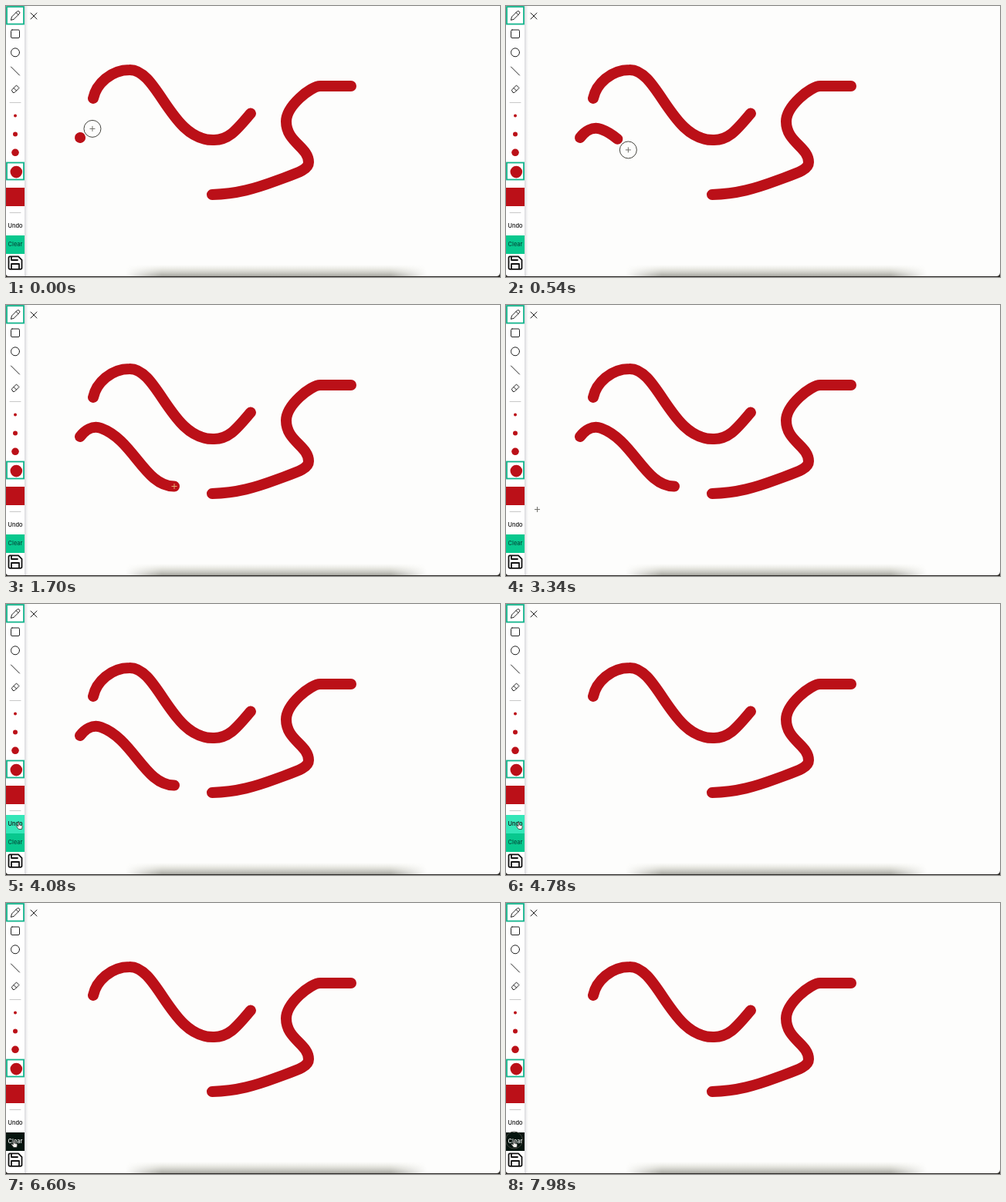
An HTML page that plays this animation: 640x352 px, repeating every 8000 ms.

```html
<!DOCTYPE html>
<html lang="en">
<head>
<meta charset="utf-8">
<title>Drawing board</title>
<style>
  html, body { margin: 0; width: 100%; height: 100%; overflow: hidden; background: #fdfdfc; }
  svg { display: block; width: 100%; height: 100%; }
  text { font: 500 7.4px Inter, "Liberation Sans", sans-serif; text-anchor: middle; fill: #111; }
  .icon { fill: none; stroke: #222; stroke-width: 1; stroke-linecap: round; stroke-linejoin: round; }
  .ink { fill: none; stroke: #bb1018; stroke-width: 14; stroke-linecap: round; stroke-linejoin: round; }
  .red { fill: #bb1018; }
  .active { fill: none; stroke: #12b48c; stroke-width: 1.8; }
</style>
</head>
<body>
<svg viewBox="0 0 640 352">
  <defs>
    <linearGradient id="side">
      <stop stop-color="#d6d6da"/><stop offset="1" stop-color="#fdfdfc" stop-opacity="0"/>
    </linearGradient>
    <linearGradient id="low" x2="0" y2="1">
      <stop stop-color="#d8d8c8" stop-opacity="0"/><stop offset="1" stop-color="#a8a8a2"/>
    </linearGradient>
    <linearGradient id="fade">
      <stop stop-color="#000"/><stop offset=".12" stop-color="#fff"/>
      <stop offset=".88" stop-color="#fff"/><stop offset="1" stop-color="#000"/>
    </linearGradient>
    <mask id="ends"><rect x="155" y="335" width="390" height="17" fill="url(#fade)"/></mask>
  </defs>

  <rect width="640" height="352" fill="#2c2926"/>
  <path d="M0 0H640V346Q640 351 635 351H4Q0 351 0 347Z" fill="#fdfdfc"/>
  <rect x="155" y="336" width="390" height="15" fill="url(#low)" mask="url(#ends)"/>
  <rect x="24" width="6" height="351" fill="url(#side)"/>
  <path class="icon" d="M32 9l8 8m0-8l-8 8"/>

  <g class="ink">
    <path d="M113 120C117 101 136 83 160 83C197 82 213 174 268 174C288 175 299 161 317 139.5"/>
    <path d="M447 104H407C395 104 363 130 363 150C363 177 392 183 392 203C392 213 377 217 350 227S300 244 267 245"/>
    <path id="live" d="M96 171C102 163 112 156 123 160C165 175 180 236 218 235.5"/>
  </g>

  <path d="M0 0H24V351H4Q0 351 0 347Z" fill="#fff"/>
  <rect class="active" x="1" y="1" width="22" height="22.5"/>
  <g class="icon">
    <path d="M6.5 18l1-4 7-7q1.5-1 2.7.3t.2 2.7l-7 7zM13 8.5l3 3"/>
    <rect x="6.5" y="31" width="11" height="10.5" rx="1.5"/>
    <circle cx="12" cy="60.3" r="5.5"/>
    <path d="M6.5 79l11 11"/>
    <path d="M7.5 109l6-6 3.5 3.5-6 6H9.5zM10 106.5l3.5 3.5"/>
    <path d="M5 125.5h14M5 268.5h14" stroke="#c8c8c8"/>
  </g>
  <g class="red">
    <circle cx="12" cy="142.5" r="2"/>
    <circle cx="12" cy="166.5" r="3"/>
    <circle cx="12" cy="190.3" r="4.8"/>
    <circle cx="13.3" cy="215.6" r="7.8"/>
    <rect y="236" width="24" height="24"/>
  </g>
  <rect class="active" x="1" y="203.5" width="22" height="22"/>

  <rect id="undo" y="274" width="24" height="24"/>
  <text x="12" y="288.4">Undo</text>
  <rect id="clear" y="298" width="24" height="24"/>
  <text id="clearText" x="12" y="312.3">Clear</text>
  <path class="icon" style="stroke:#111;stroke-width:1.8"
    d="M3.5 327q0-1.7 1.7-1.7H16l4.5 4.5V340q0 1.8-1.8 1.8H5.2q-1.7 0-1.7-1.8zM7 325.5v4.5h8M7 341.5v-6.5h10v6.5"/>

  <!-- Routes of the pointer between actions -->
  <path id="toUndo" d="M218 235.5Q66 234 17 283" fill="none"/>
  <path id="toClear" d="M17 283L10.5 308" fill="none"/>

  <g id="cursor">
    <circle id="press" r="11" fill="none" stroke="#44443e"/>
    <path id="plus" d="M-3.5 0h7M0-3.5v7"/>
    <path id="hand" d="M-1.2 1q1-1 1.6 0v3l3 .8q1 .4.8 1.5L3.4 9.5h-4L-3.6 5.6q0-1 1-.8l1.4 1z"
      fill="#f4f4f0" stroke="#333" stroke-width=".8"/>
  </g>
</svg>
<script>
  const LOOP = 8000, SPEED = 0.104, LEAD = 20;
  const $ = id => document.getElementById(id);
  const live = $("live"), total = live.getTotalLength();

  const within = (t, from, to) => t >= from && t < to;
  const show = (id, on) => $(id).setAttribute("visibility", on ? "visible" : "hidden");
  const paint = (id, color) => $(id).setAttribute("fill", color);

  function glide(route, t, from, to) {
    const k = Math.min(1, (t - from) / (to - from));
    return route.getPointAtLength(route.getTotalLength() * k * (2 - k));
  }

  function cursorAt(t) {
    if (t < 2400) return live.getPointAtLength(Math.min(total, t * SPEED + LEAD));
    if (t < 5480) return glide($("toUndo"), t, 2400, 3900);
    return glide($("toClear"), t, 5480, 5950);
  }

  function draw(t) {
    const { x, y } = cursorAt(t);
    const onToolbar = x < 24, overClear = onToolbar && y >= 298;
    const overUndo = onToolbar && within(y, 274, 298);
    live.style.strokeDasharray = `${Math.max(0.01, Math.min(total, t * SPEED))} 1000`;
    show("live", t < 4340);
    $("cursor").setAttribute("transform", `translate(${x} ${y})`);
    show("press", t < 1580 || within(t, 4160, 4340) || t >= 7960);
    show("plus", !onToolbar);
    show("hand", onToolbar);
    $("plus").setAttribute("stroke", within(t, 1440, 2430) ? "#e3ab72" : "#70706a");
    paint("undo", overUndo ? "#34e6b8" : "#fff");
    paint("clear", overClear ? "#06150f" : "#08c88e");
    $("clearText").style.fill = overClear ? "#fff" : "#064a3c";
  }

  const start = performance.now();
  function tick() {
    draw((performance.now() - start) % LOOP);
    requestAnimationFrame(tick);
  }
  tick();
</script>
</body>
</html>
```
